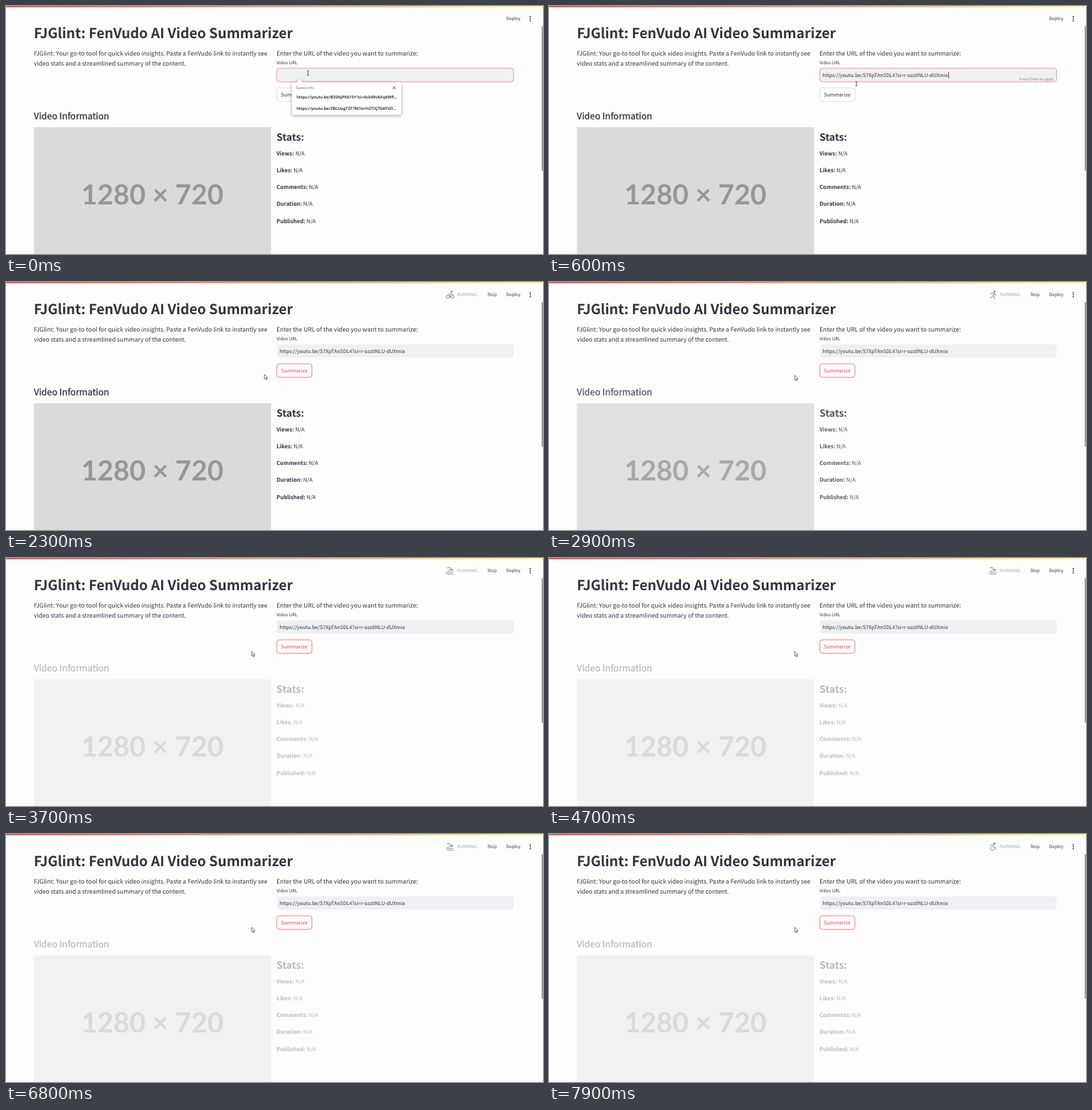
An HTML page for the animation above (8000 ms loop, 800 by 370 pixels).

```html
<!DOCTYPE html>
<html lang="en">
<head>
<meta charset="utf-8">
<title>Video summarizer</title>
<style>
html, body { margin: 0; width: 100%; height: 100%; overflow: hidden; background: #fefdfe; }
svg { display: block; width: 800px; height: 370px; }
text {
  font: 8.97px "Noto Sans CJK JP", "Noto Sans CJK SC", "Noto Sans", sans-serif;
  fill: #31333f; white-space: pre; text-rendering: geometricPrecision;
}
.b { font-weight: 700; }
text.title { font-size: 20.65px; }
text.head { font-size: 13.35px; stroke: #31333f; stroke-width: .3px; }
text.stats { font-size: 14.7px; }
text.row { font-size: 8.2px; }
text.field { font-size: 7.46px; }
text.small { font-size: 6.55px; }
text.hint { font-size: 5.55px; fill: #83858d; }
text.size { font: 700 41.3px Lato, sans-serif; fill: #969696; text-anchor: middle; }
text.saved { font: 600 6.08px "Open Sans", "Noto Sans", sans-serif; fill: #111; }
text.note { font: 5.5px "Open Sans", "Noto Sans", sans-serif; fill: #666; }
#menu { filter: drop-shadow(0 1px 2px #0006); }
#icons { fill: none; stroke: #80828b; stroke-width: 1; stroke-linecap: round; stroke-linejoin: round; }
#icons circle.h { fill: #80828b; stroke: none; }
</style>
</head>
<body>
<svg viewBox="0 0 800 370">
  <defs>
    <linearGradient id="bar">
      <stop stop-color="#f5414a"/><stop offset="1" stop-color="#fffa78"/>
    </linearGradient>
  </defs>
  <rect width="800" height="370" fill="#fefdfe"/>
  <rect width="800" height="1.8" fill="url(#bar)"/>
  <rect x="798" y="30" width="2" height="216" rx="1" fill="#9c9c9e"/>

  <text class="small" x="745" y="21.4">Deploy</text>
  <g fill="#31333f">
    <circle cx="781" cy="16" r="1"/><circle cx="781" cy="19" r="1"/><circle cx="781" cy="22" r="1"/>
  </g>
  <g id="running">
    <text class="small" x="672" y="21.4" style="fill:#a3a4aa">RUNNING...</text>
    <text class="small" x="717" y="21.4">Stop</text>
    <g id="icons">
      <g>
        <circle class="h" cx="664" cy="14.3" r="1.4"/>
        <path d="M658 17.5l2.2-1.4 2.8.6 1.2 2.3 2 .3M663 16.8l-1.5 3.6 2 1.6.2 3M661.5 20.4l-1.3 2.4-3 .4"/>
      </g>
      <g>
        <circle class="h" cx="663" cy="14.3" r="1.4"/>
        <path d="M659 19l.8-2.4 2.6.1 1.4 2 2-.6M662.4 16.7l-1 3.7 3 1.5-.8 3M661.4 20.4l-1 4.4-2.4-.2"/>
      </g>
      <g>
        <circle cx="658.3" cy="22" r="2.4"/><circle cx="665.3" cy="22" r="2.4"/>
        <circle class="h" cx="663.8" cy="14.4" r="1.3"/>
        <path d="M665.5 18.3h-2l-1.7-1.7-2 2.1 2 1.5v2.4"/>
      </g>
      <g>
        <circle class="h" cx="664.2" cy="17.7" r="1.4"/>
        <path d="M657.5 14.7l3.3-.5 1.6 3-4 2.6M656 21.3q1.4-1.2 2.8 0t2.8 0 2.8 0 2 0M656 24q1.4-1.2 2.8 0t2.8 0 2.8 0 2 0"/>
      </g>
      <g>
        <circle class="h" cx="663.6" cy="14.2" r="1.4"/>
        <path d="M658 17l2-1.5 2.6 1-1.4 2.8 3.6.2.8 3.4M658.8 18.8a3.1 3.1 0 1 0 4.6 3.5"/>
      </g>
    </g>
  </g>

  <text class="title b" x="41.5" y="48">FJGlint: FenVudo AI Video Summarizer</text>
  <text x="41.5" y="73.6">FJGlint: Your go-to tool for quick video insights. Paste a FenVudo link to instantly see</text>
  <text x="41.5" y="89.3">video stats and a streamlined summary of the content.</text>
  <text x="403" y="73.6">Enter the URL of the video you want to summarize:</text>
  <text class="small" x="403" y="86.8">Video URL</text>

  <rect id="input" x="403.4" y="92.9" width="352.8" height="20.2" rx="4" fill="#eff0f4" stroke-width=".8"/>
  <g id="url">
    <text class="field" x="407.6" y="106">https://youtu.be/S7XpTAnSDL4?si=r-ozz0NLU-dUXmia</text>
  </g>
  <rect id="caret" x="595" y="98.5" width=".8" height="9.5" fill="#31333f"/>
  <text id="hint" class="hint" x="700.8" y="110.6">Press Enter to apply</text>

  <rect id="button" x="403.5" y="122.1" width="52.3" height="20.2" rx="4" stroke-width=".8"/>
  <text id="label" class="field" x="409.6" y="135.2">Summarize</text>

  <g id="stale">
    <text class="head" x="41.5" y="168.8">Video Information</text>
    <rect x="41.5" y="181" width="353.5" height="200" rx="1" fill="#dadadb"/>
    <text class="size" x="218" y="296">1280 × 720</text>
    <text class="stats b" x="403" y="200.6">Stats:</text>
    <g id="rows"></g>
  </g>

  <g id="menu">
    <path d="M433 113.8l4.5-4.6 4.5 4.6h144a3 3 0 0 1 3 3v42.6a3 3 0 0 1-3 3h-157a3 3 0 0 1-3-3v-42.6a3 3 0 0 1 3-3z" fill="#fff"/>
    <text class="note" x="432" y="124.4">Saved Info</text>
    <path d="M576 119.8l4.4 4.4m0-4.4l-4.4 4.4" stroke="#333" stroke-width=".8"/>
    <text class="saved" x="433" y="137.8">https://youtu.be/B3SNjPX615Y?si=Ack69vbXqKWP...</text>
    <text class="saved" x="433" y="154.8">https://youtu.be/ZBCUegTZF7M?si=hOTXjTGKFVD...</text>
  </g>

  <path id="beam" d="M-1.6-3.4q1.6 0 1.6.8 0-.8 1.6-.8M0-2.6v5.2M-1.6 3.4q1.6 0 1.6-.8 0 .8 1.6.8" fill="none" stroke="#333" stroke-width=".8"/>
  <path id="hand" d="M-1-4q1-1 1.6 0v2.6l3 .8q1 .3.8 1.6l-.6 2.6-.6 1.6h-3.6l-2.4-3.4q-.2-1 1-.8l.8.6z" fill="#fff" stroke="#222" stroke-width=".7"/>
  <path id="arrow" d="M0-3.7v7l1.6-1.4 1.1 2.5 1.2-.5-1.1-2.5h2.2z" fill="#fff" stroke="#333" stroke-width=".7"/>
</svg>
<script>
const $ = id => document.getElementById(id);
// Icon order while running: 0, 1 runner, 2 bicycle, 3 swimmer, 4 wheelchair
const POSES = [2, 3, 1, 0, 2, 1, 4, 3, 0, 2, 4];

$('rows').innerHTML = ['Views', 'Likes', 'Comments', 'Duration', 'Published'].map((name, i) =>
  `<text class="row" x="403" y="${222.8 + i * 25.2}"><tspan class="b">${name}:</tspan> N/A</text>`).join('');

const show = (id, on) => $(id).style.display = on ? '' : 'none';
const progress = (t, from, to) => Math.min(1, Math.max(0, (t - from) / (to - from)));
const smooth = p => p * p * (3 - 2 * p);

// Pointer stops: start, end, x, y
const STOPS = [[100, 500, 458, 116], [800, 1300, 439, 137], [1900, 2500, 366, 143]];
function pointer(t) {
  let x = 450, y = 100;
  for (const [from, to, tx, ty] of STOPS) {
    const p = smooth(progress(t, from, to));
    x += (tx - x) * p;
    y += (ty - y) * p;
  }
  return [x, y];
}

// CSS "ease-in": cubic-bezier(.42, 0, 1, 1)
function easeIn(x) {
  let lo = 0, hi = 1;
  for (let i = 0; i < 20; i++) {
    const s = (lo + hi) / 2;
    if (1.26 * s * (1 - s) ** 2 + 3 * s * s * (1 - s) + s ** 3 < x) lo = s; else hi = s;
  }
  return 3 * lo * lo - 2 * lo ** 3;
}

function draw(t) {
  const [x, y] = pointer(t);
  const over = x > 403 && x < 456 && y > 122 && y < 143;
  const pressed = t >= 1700 && t < 1900;
  const pasted = t >= 300;
  const typing = pasted && t < 1700;

  show('menu', !pasted);
  show('url', pasted);
  show('hint', typing);
  show('caret', typing && t % 1000 >= 300 && t % 1000 < 800);
  $('input').setAttribute('stroke', t < 1900 ? '#f07c80' : 'none');

  const active = over || t >= 1700;
  $('button').setAttribute('fill', pressed ? '#e9434a' : '#fefdfe');
  $('button').setAttribute('stroke', pressed ? '#e9434a' : active ? '#ee5c62' : '#d6d6d9');
  $('label').style.fill = pressed ? '#fff' : active ? '#e04248' : '#31333f';

  const kind = over ? 'hand' : y < 122 ? 'beam' : 'arrow';
  for (const id of ['hand', 'beam', 'arrow']) {
    show(id, id === kind);
    $(id).setAttribute('transform', `translate(${x} ${y})`);
  }

  show('running', t >= 2200);
  const pose = POSES[Math.floor(t % 2200 / 200)];
  [...$('icons').children].forEach((g, i) => g.style.display = i === pose ? '' : 'none');
  $('stale').style.opacity = 1 - .67 * easeIn(progress(t, 2450, 3450));
}

function loop() {
  draw(Math.floor(performance.now() % 8000 / 100) * 100);
  requestAnimationFrame(loop);
}
loop();
</script>
</body>
</html>
```
